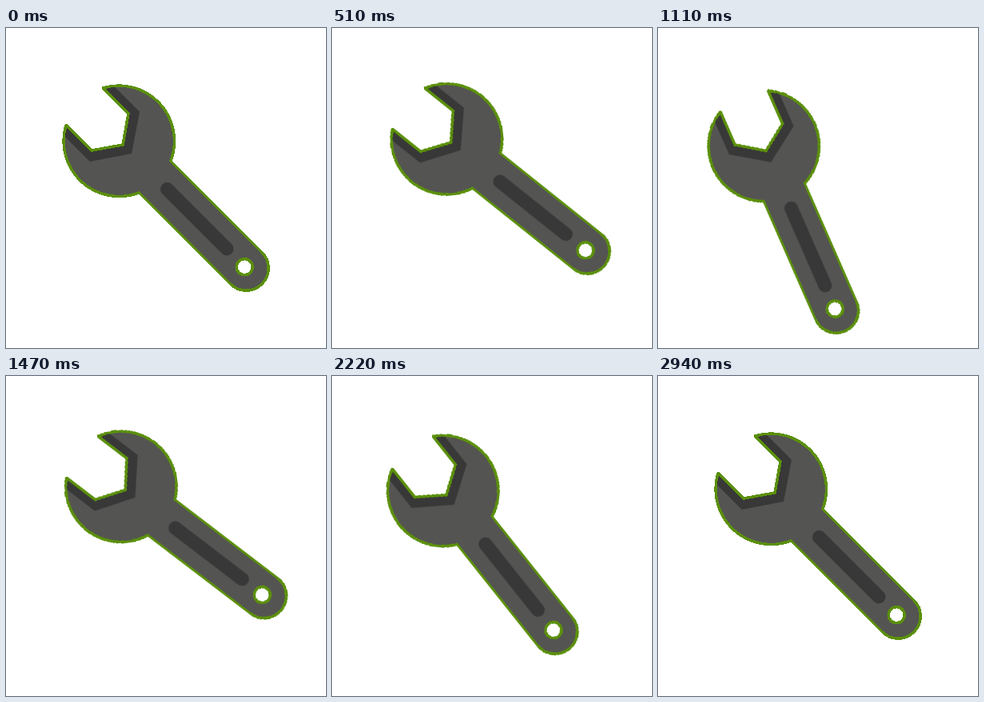
Write an HTML page without scripts that moves like this. It is 400 by 400 pixels and loops after 4970 ms.

```html
<!DOCTYPE html>
<html lang="en">
<head>
<meta charset="utf-8">
<title>Wrench</title>
<style>
  html, body { margin: 0; width: 100%; height: 100%; overflow: hidden; background: #fff; }
  svg { display: block; width: 100%; height: 100%; }

  .wrench {
    transform-origin: 120.5px 120.5px;
    animation: ratchet 4970ms linear infinite;
  }
  .body { fill: #545452; }
  .shade { fill: #383838; }
  .slot { stroke: #383838; stroke-width: 17; stroke-linecap: round; }
  .edge, .hole { stroke: #5b900a; stroke-width: 3.5; shape-rendering: crispEdges; }
  .edge { fill: none; stroke-linejoin: round; }
  .hole { fill: #fff; }

  /* five turns: slow pull, quick return; then settle and rest */
  @keyframes ratchet {
    0% { transform: rotate(0deg); animation-timing-function: ease-in-out; }
    4.406%, 13.748%, 23.09%, 32.432%, 41.774% { transform: rotate(22deg); }
    5.01%, 14.352%, 23.694%, 33.036%, 42.378% { transform: rotate(20.5deg); }
    6.096%, 15.438%, 24.78%, 34.122%, 43.464% { transform: rotate(15deg); }
    7.303%, 16.645%, 25.987%, 35.329%, 44.671% { transform: rotate(6.6deg); }
    8.792%, 18.134%, 27.476%, 36.818%, 46.16% { transform: rotate(-2.9deg); }
    10.241%, 19.583%, 28.925%, 38.267%, 47.609% { transform: rotate(-6.3deg); }
    10.865%, 20.207%, 29.549%, 38.891%, 48.233% { transform: rotate(-7.5deg); }
    11.75%, 21.092%, 30.434%, 39.776%, 49.118% { transform: rotate(-10deg); }
    12.998%, 22.34%, 31.682%, 41.024% { transform: rotate(21.3deg); }
    49.7% { transform: rotate(-10deg); animation-timing-function: ease; }
    59.155%, 100% { transform: rotate(0deg); }
  }
</style>
</head>
<body>
<svg viewBox="0 0 400 400">
  <defs>
    <path id="outline" d="M121.4 75 A69.2 69.2 0 0 1 205.8 166.3 L320 280.5
      A27.9 27.9 0 0 1 280.5 320 L166.3 205.8 A69.2 69.2 0 0 1 75 121.4
      L107 153 L146 146 L153 107 Z"/>
    <clipPath id="inside"><use href="#outline"/></clipPath>
  </defs>
  <g class="wrench">
    <use class="body" href="#outline"/>
    <path class="shade" clip-path="url(#inside)" d="M121 75 L153 107 L146 146 L107 153 L75 121
      L71.5 133.7 L104.8 167 L157 157 L167 104.8 L133.7 71.5 Z"/>
    <path class="slot" d="M201.5 201.5 L276 276"/>
    <use class="edge" href="#outline"/>
    <circle class="hole" cx="298.2" cy="298.7" r="10"/>
  </g>
</svg>
</body>
</html>
```
